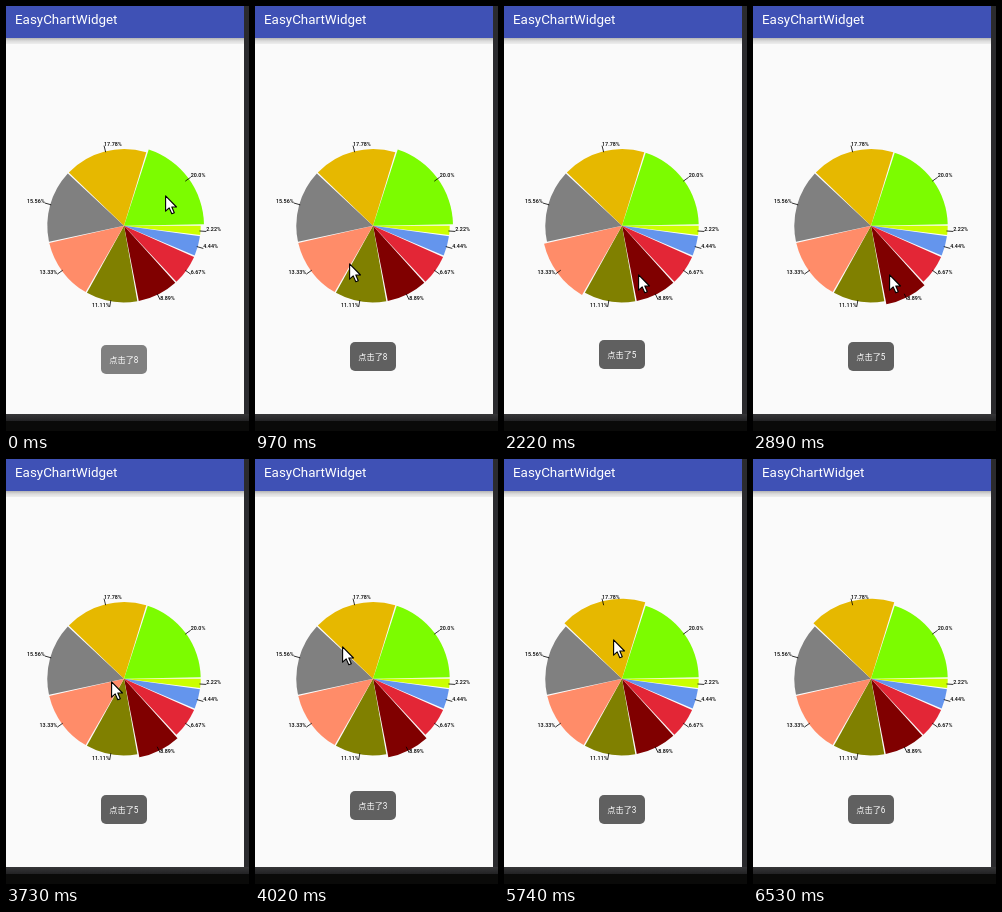
Recreate the animation shown at these times as an HTML page. Size 243 by 425 pixels, loop 7270 ms.

```html
<!DOCTYPE html>
<html lang="en">
<head>
<meta charset="utf-8">
<title>EasyChartWidget</title>
<style>
  html, body { margin: 0; width: 100%; height: 100%; overflow: hidden; background: #fafafa; }
  svg { display: block; width: 243px; height: 425px; }
  text { font-family: Roboto, "Noto Sans CJK SC", "Noto Sans CJK JP", sans-serif; }
</style>
</head>
<body>
<svg viewBox="0 0 243 425">
  <defs>
    <linearGradient id="shadow" x2="0" y2="1">
      <stop offset="0" stop-color="#b4b4b4"/>
      <stop offset=".5" stop-color="#dcdcdc"/>
      <stop offset="1" stop-color="#eeeeee"/>
    </linearGradient>
    <linearGradient id="bezel" x2="0" y2="1">
      <stop offset="0" stop-color="#363638"/>
      <stop offset="1" stop-color="#222224"/>
    </linearGradient>
  </defs>
  <rect width="243" height="425" fill="#fafafa"/>
  <rect y="32" width="238" height="6" fill="url(#shadow)"/>
  <rect width="238" height="32" fill="#3f51b5"/>
  <text x="9" y="18.4" font-size="13.4" fill="#fff">EasyChartWidget</text>
  <rect x="238" width="5" height="425" fill="#2b2b2e"/>
  <rect y="408" width="243" height="7" fill="url(#bezel)"/>
  <rect y="415" width="243" height="10" fill="#0a0a09"/>
  <g id="slices"></g>
  <g id="labels" font-size="5.4" font-weight="500" fill="#000"></g>
  <g id="toast">
    <rect x="95" width="46" height="29" rx="5" fill="#606060"/>
    <text id="message" x="103.3" y="18" font-size="8.2" fill="#fff"></text>
  </g>
  <path id="cursor" d="M.6 .9V16.2L4.2 12.9L6.8 18.8L9.3 17.7L6.8 12H11.5Z"
        fill="#fff" stroke="#000" stroke-width="1.1" stroke-linejoin="round"/>
</svg>
<script>
const LOOP = 7270, TICK = 138.5;
const CX = 118, CY = 219.7, RADIUS = 76.7, POPPED = 80, LABEL_RADIUS = 82.5, GAP = 1.1;
const TOAST_TOP = 336, TOAST_RISE = 40, TOAST_SLIDE = 440, TOAST_FADE = 170;
const COLORS = ['#ccff00', '#6495ed', '#e32636', '#800000', '#808000',
                '#ff8c69', '#808080', '#e6b800', '#7cfc00'];

// [time, slice]
const SELECTIONS = [[0, 8], [1530, 5], [2890, 3], [4760, 6], [5740, 7]];
// [time, digit]
const TOASTS = [[-134, 8], [1853, 5], [3795, 3], [5730, 6]];
// [time, x, y] where the pointer turns, rests or leaves
const POINTER = [
  [270, 159, 189], [690, 129, 264], [970, 94, 257], [1120, 73, 249], [1690, 73, 249],
  [1800, 81, 254], [2220, 135, 268], [3320, 137, 267], [3730, 90, 201], [4020, 87, 187],
  [4330, 74, 196], [4890, 74, 196], [5190, 109, 180], [5870, 109, 180], [6260, 182, 370],
  [6530, 158, 490]
];

const $ = id => document.getElementById(id);
const clamp01 = v => Math.min(1, Math.max(0, v));
const startAngle = i => 4 * i * (i + 1);
const polar = (r, deg) => {
  const a = deg * Math.PI / 180;
  return [CX + r * Math.cos(a), CY + r * Math.sin(a)];
};
const sector = (i, r) =>
  `M${CX} ${CY}L${polar(r, startAngle(i))}A${r} ${r} 0 0 1 ${polar(r, startAngle(i + 1) - GAP)}Z`;
const latest = (events, t) => events.findLast(event => event[0] <= t);
const overshoot = p => 1 - 2.70158 * (1 - p) ** 3 + 1.70158 * (1 - p) ** 2;

function add(parent, tag, attrs) {
  const el = document.createElementNS('http://www.w3.org/2000/svg', tag);
  for (const key in attrs) el.setAttribute(key, attrs[key]);
  return parent.appendChild(el);
}

function along(path, t) {
  const next = path.findIndex(point => point[0] > t);
  if (next < 1) return path.at(next).slice(1);
  const [t0, x0, y0] = path[next - 1], [t1, x1, y1] = path[next];
  const p = (t - t0) / (t1 - t0);
  return [x0 + (x1 - x0) * p, y0 + (y1 - y0) * p];
}

const slices = COLORS.map((fill, i) => {
  const mid = (startAngle(i) + startAngle(i + 1)) / 2;
  const [x, y] = polar(LABEL_RADIUS, mid);
  const percent = ((i + 1) / 45 * 100).toFixed(2).replace(/0$/, '');
  add($('labels'), 'path', {
    d: `M${polar(RADIUS - 1, mid)}L${x} ${y}`, stroke: '#000', 'stroke-width': .8
  });
  add($('labels'), 'text', {
    x, y, 'text-anchor': mid < 90 || mid > 225 ? 'start' : 'end'
  }).textContent = percent + '%';
  return add($('slices'), 'path', { fill });
});

function draw(t) {
  const [, selected] = latest(SELECTIONS, t);
  slices.forEach((el, i) => el.setAttribute('d', sector(i, i === selected ? POPPED : RADIUS)));

  // The pointer and the toast advance in coarse ticks.
  const held = Math.floor(t / TICK) * TICK;
  const [x, y] = along(POINTER, held).map(Math.round);
  $('cursor').setAttribute('transform', `translate(${x} ${y})`);

  const [shown, digit] = latest(TOASTS, held);
  const age = held - shown;
  const top = TOAST_TOP + TOAST_RISE * (1 - overshoot(clamp01(age / TOAST_SLIDE)));
  $('toast').setAttribute('transform', `translate(0 ${Math.round(top)})`);
  $('toast').setAttribute('opacity', clamp01(age / TOAST_FADE));
  $('message').textContent = '点击了' + digit;
}

const origin = performance.now();
function tick() {
  draw((performance.now() - origin) % LOOP);
  requestAnimationFrame(tick);
}
tick();
</script>
</body>
</html>
```
